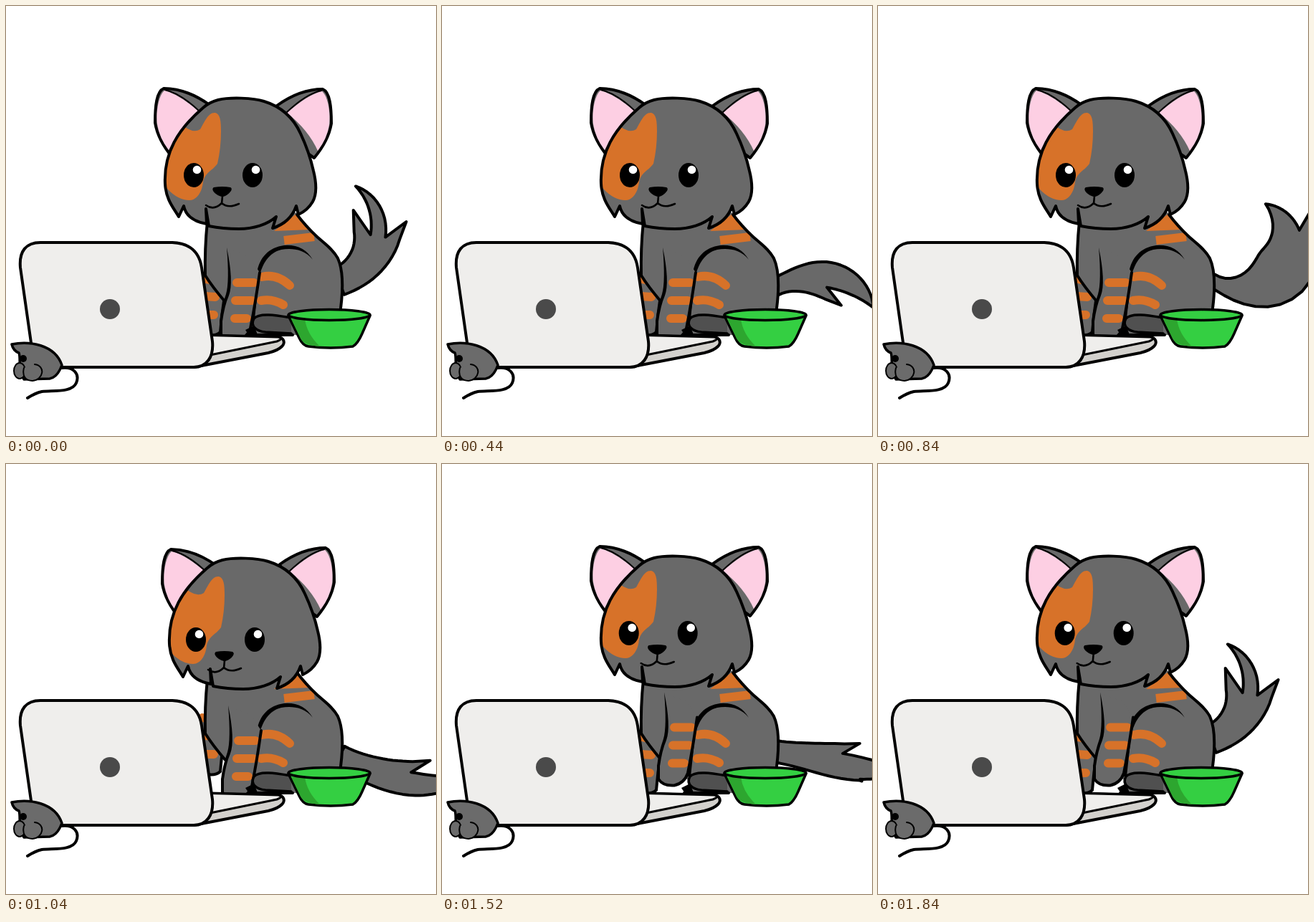
Recreate the animation shown at these times as an HTML page. Size 600 by 600 pixels, loop 2.64 s.

```html
<!DOCTYPE html>
<html lang="en">
<head>
<meta charset="utf-8">
<title>Cat at a laptop</title>
<style>
  html, body { margin: 0; width: 100%; height: 100%; overflow: hidden; background: #fff; }
  svg { display: block; width: 100vw; height: 100vh; }
  .fur { fill: #696969; }
  .rust { fill: #d77229; stroke: none; }
  .stripe { fill: none; stroke: #d77229; stroke-width: 12; }
  .pink { fill: #fdcfe3; stroke: none; }
  .ink { fill: #000; stroke: none; }
  .flat { stroke: none; }
  .none { fill: none; }
</style>
</head>
<body>
<svg viewBox="0 0 600 600" stroke="#000" stroke-width="4" stroke-linecap="round" stroke-linejoin="round">
  <defs>
    <path id="skull" d="M275 142Q284 134 296 131C312 127 345 128 360 133C386 141 402 158 411 178C419 195 425 212 429 230C433 246 434 262 428 273Q421 285 408 291L405 279Q397 302 372 310L377 294C365 305 345 311 325 311Q303 311 283 307L279 283L280 304Q252 299 248 279L241 294C234 282 223 270 222 248C220 205 240 172 275 142Z"/>
    <clipPath id="inSkull"><use href="#skull"/></clipPath>
    <g id="ear">
      <path class="fur" d="M284 138Q252 115 220 115C210 119 208 140 208 163Q212 187 232 211L262 190Z"/>
      <path class="pink" d="M221 118C212 126 209 150 211 165Q214 184 227 201Q240 172 270 148Q240 122 221 118Z"/>
      <path class="none" d="M222 117Q244 122 271 148" stroke-width="2"/>
    </g>
    <g id="eye">
      <ellipse class="ink" rx="14" ry="17"/>
      <circle cx="4.5" cy="-7.5" r="5.8" fill="#fff" stroke="none"/>
    </g>
  </defs>

  <path id="tail" class="fur"/>

  <g id="farLeg">
    <path class="fur flat" d="M272 378L306 402Q301 430 299 455Q292 462 276 458Z"/>
    <path class="stripe" d="M274 380L288 383M278 405L292 406M278 431H290"/>
    <path class="none" d="M305 404Q301 430 299 455Q292 462 276 458"/>
  </g>

  <path class="fur flat" d="M281 298Q277 340 278 376L306 413L345 442L340 459H466L468 420C472 395 471 370 463 352Q454 338 432 319L404 288Z"/>
  <path class="rust" d="M405 290L425 312L374 314Z"/>
  <path class="stripe" stroke-linecap="butt" d="M388 327L430 322"/>
  <path class="none" d="M281 300Q277 340 278 376Q288 392 306 413M406 291Q418 307 434 322C444 331 456 339 463 352Q473 374 467 422M338 459H400"/>

  <path class="stripe" d="M357 378Q378 373 396 390M356 411Q372 408 387 417"/>
  <path class="ink" d="M428 354C415 338 397 338 384 340C367 344 357 360 353 380L347 436H343L350 372C354 350 367 337 388 334Q415 332 428 354Z"/>

  <g id="nearLeg">
    <path class="fur flat" d="M308 338C311 360 316 385 308 405Q300 430 300 458Q306 468 322 467Q336 464 341 450Q348 415 354 372L340 350Z"/>
    <path class="stripe" d="M322 386H346M320 411H343M319 436H336"/>
    <path class="ink" d="M308 337Q318 385 311 404Q305 418 302 440H298Q300 422 307 402Q312 385 308 337Z"/>
    <path class="none" d="M300 440V458Q306 468 322 467Q336 464 341 450Q348 415 354 372"/>
  </g>

  <path class="ink" d="M334 452L346 446L352 461H340Z"/>
  <path d="M398 435C380 432 354 427 346 436C340 447 350 454 362 455L398 457" fill="#505050" stroke-width="3.5"/>

  <g id="earL"><use href="#ear"/></g>
  <g id="earR"><use href="#ear" transform="translate(662 1) scale(-1 1)"/></g>
  <g id="head">
    <use href="#skull" class="fur flat"/>
    <g clip-path="url(#inSkull)">
      <path id="patch" class="rust" d="M205 240L225 255Q240 271 256 271C267 271 274 258 275 245C279 231 288 230 295 220Q300 198 300 175C300 160 299 151 292 149C282 148 277 162 271 172Q263 177 253 171L235 160Z"/>
    </g>
    <use href="#skull" class="none"/>
  </g>
  <g id="face">
    <use href="#eye" x="262" y="236"/>
    <use href="#eye" x="344" y="236"/>
    <path class="ink" d="M290 253Q302 251 313 253C319 256 308 266 302 266C296 266 284 257 290 253Z"/>
    <path class="none" stroke-width="2.6" d="M302 265L301 276M279 278Q290 286 301 275Q310 283 325 276"/>
  </g>

  <path d="M265 459L380 462C388 463 390 470 385 475Q379 481 366 484L262 504Z" fill="#d3d1cd"/>
  <path d="M265 459L380 462Q388 464 378 468L270 490Z" fill="#efeeec" stroke-width="3"/>
  <path d="M48 330H232C258 331 270 345 273 365L288 468C290 490 280 504 262 504H62C45 504 38 492 35 470L20 365C18 342 28 330 48 330Z" fill="#efeeec"/>
  <circle cx="145" cy="423" r="14" fill="#4a4a4a" stroke="none"/>

  <path class="none" d="M78 505C95 503 103 514 98 526C92 540 65 536 50 538Q41 540 30 547"/>
  <g fill="#6b6b6b" stroke-width="3.5">
    <path d="M8 472C32 467 68 472 78 501Q72 518 61 520L25 521C16 508 21 492 18 484Q10 481 8 472Z"/>
    <ellipse cx="19" cy="509" rx="8" ry="11" stroke-width="2"/>
    <path d="M25 505C22 517 28 523 37 523C52 522 56 502 40 500" stroke-width="2"/>
  </g>
  <circle class="ink" cx="24" cy="492" r="5"/>

  <g fill="#34cf42" stroke-width="3.5">
    <path d="M394 432L409 463Q414 474 422 475Q453 479 484 475Q491 471 497 457L508 432Z"/>
    <path class="flat" fill="#2da62f" d="M398 437L411 464Q415 473 438 475Q420 458 417 437Z"/>
    <ellipse cx="451" cy="431" rx="57" ry="7.5"/>
  </g>
</svg>
<script>
const LOOP = 2640, STEP = 40, BASE_X = 465;
const $ = id => document.getElementById(id);
const mix = (a, b, k) => a + (b - a) * k;

// The tail is a bending spine: base height, length, headings at root, middle and tip,
// half widths at root and middle, then place and size of the left and right tuft
const high  = [384, 166, -20, -78, -146, 20, 28, 0.52, 30, 0.52, 26];
const level = [392, 152, -26, 10, 54, 12, 24, 0.5, 0, 0.5, 24];
const low   = [408, 190, 28, 10, -10, 16, 22, 0.55, 24, 0.6, 0];
const hook  = [382, 222, 34, -50, -160, 9, 40, 0.55, 0, 0.75, 28];
const arch  = [374, 184, -72, 10, 80, 12, 25, 0.27, 9, 0.86, 14];

// Each track lists [time, values]
const tailTrack = [[240, high], [440, level], [600, low], [840, hook], [1040, low], [1480, low], [1680, arch], [1840, high]];
const nod = (dx, dy, end = 0) => [[840, [0, 0]], [1040, [dx, dy]], [1240, [end, 0]]];
const moves = {
  head: nod(6, 3),
  patch: nod(-1, 5),
  face: nod(3, 9, -1.3),
  earL: nod(10, 4),
  earR: nod(4, 1),
  farLeg: nod(0, -26),
  nearLeg: [[840, [0, 0]], [1040, [2, 0]], [1240, [2, -18.5]]]
};

function sample(track, t) {
  const i = track.findIndex(key => key[0] > t);
  if (i === 0) return track[0][1];
  if (i < 0) return track[track.length - 1][1];
  const [t0, a] = track[i - 1], [t1, b] = track[i];
  return a.map((v, n) => mix(v, b[n], (t - t0) / (t1 - t0)));
}

function tailPath([y0, len, a0, a1, a2, w0, w1, uL, tuftL, uR, tuftR]) {
  const heading = s => (s < 0.5 ? mix(a0, a1, s * 2) : mix(a1, a2, s * 2 - 1)) * Math.PI / 180;
  const place = (s, out, ahead = 0) => {
    let x = BASE_X, y = y0;
    for (let i = 0, n = 24; i < n; i++) {
      const a = heading(s * (i + 0.5) / n);
      x += Math.cos(a) * len * s / n;
      y += Math.sin(a) * len * s / n;
    }
    const c = Math.cos(heading(s)), d = Math.sin(heading(s));
    return [x + c * ahead - d * out, y + d * ahead + c * out].map(v => v.toFixed(1));
  };
  const half = s => s < 0.5
    ? mix(w0, w1, Math.sin(s * Math.PI) ** 2)
    : w1 * (1 - (s * 2 - 1) ** 2);
  // One edge: swell into the tuft, its point, then a notch and on to the tip
  const edge = (dir, u, tuft) => {
    const points = [], n = 14;
    for (let i = 0; i <= n; i++) {
      const s = u * i / n, swell = Math.max(0, 1 - (u - s) * 4) ** 2;
      points.push(place(s, dir * (half(s) + tuft * 0.15 * swell)));
    }
    points.push(place(u, dir * (half(u) + tuft * 0.35), tuft));
    for (let i = 0; i <= n; i++) {
      const s = mix(u, 1, i / n);
      points.push(place(s, dir * half(s) * (1 - tuft / 45)));
    }
    return points;
  };
  return 'M' + [...edge(-1, uL, tuftL), ...edge(1, uR, tuftR).reverse()].join('L') + 'Z';
}

function draw(time) {
  const t = Math.floor((time % LOOP) / STEP) * STEP;
  $('tail').setAttribute('d', tailPath(sample(tailTrack, t)));
  for (const id in moves) $(id).setAttribute('transform', `translate(${sample(moves[id], t)})`);
}

const start = performance.now();
function tick() {
  draw(performance.now() - start);
  requestAnimationFrame(tick);
}
tick();
</script>
</body>
</html>
```
